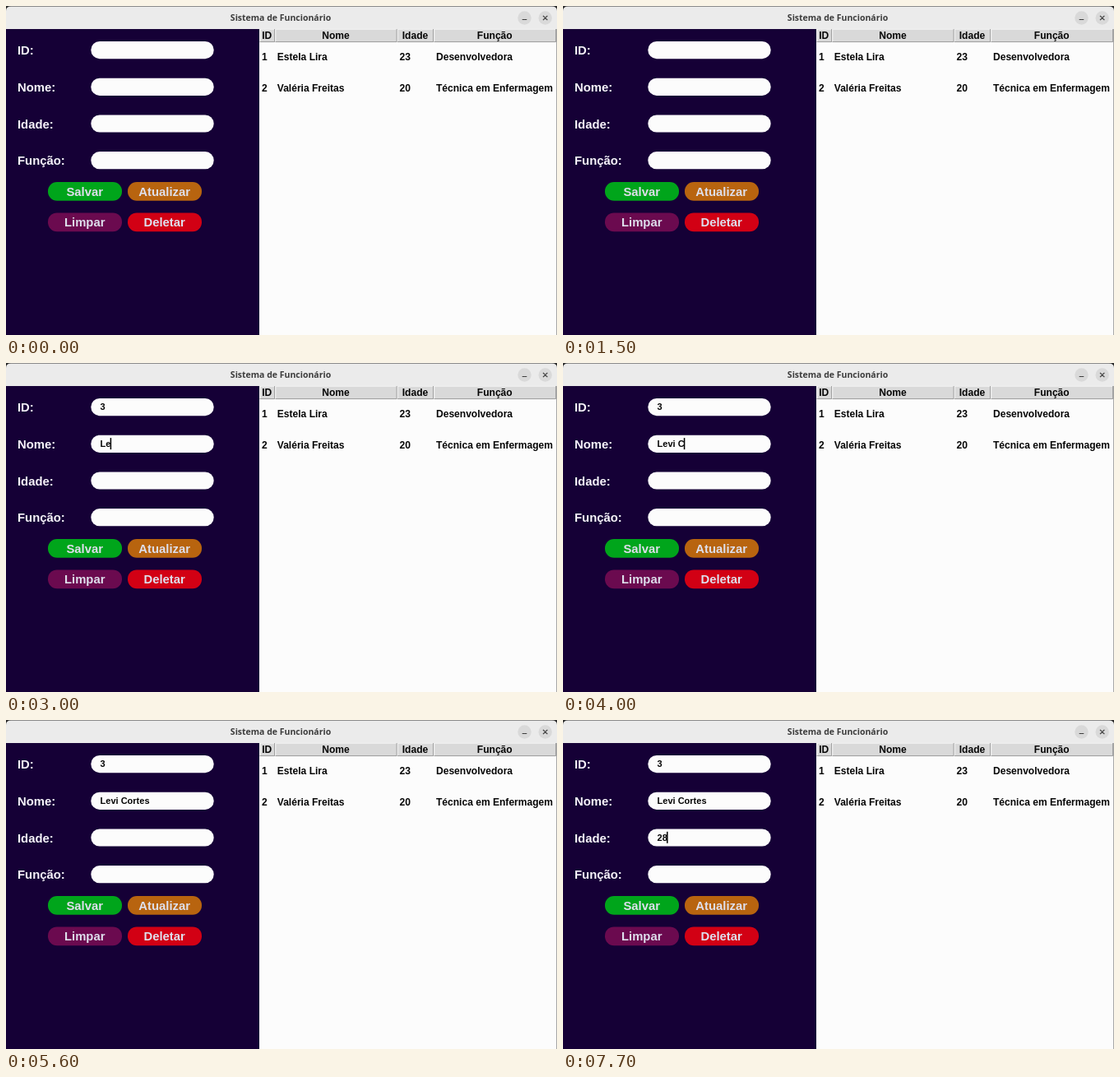
These frames come from a looping animation (670x400 px, 8000 ms). An HTML page:

```html
<!DOCTYPE html>
<html lang="pt">
<head>
<meta charset="utf-8">
<title>Sistema de Funcionário</title>
<style>
  html, body { margin: 0; width: 100%; height: 100%; overflow: hidden; background: #fcfcfc; }
  svg { display: block; width: 670px; height: 400px; }
  text { font: bold 12.05px "Liberation Sans", Arial, sans-serif; fill: #060606; white-space: pre; }
  .title { font: bold 10.5px "Noto Sans", sans-serif; fill: #3d3d3d; }
  .label { font-size: 14.85px; fill: #f6f4fa; }
  .button { font-size: 14.85px; fill: #dedfec; }
  .typed { font-size: 11px; }
  .mid { text-anchor: middle; }
</style>
</head>
<body>
<svg id="stage" viewBox="0 0 670 400">
  <rect width="670" height="400" fill="#fcfcfc"/>
  <rect width="670" height="28" fill="#2b2b2b"/>
  <path d="M0 28V6Q0 .5 6 .5H664Q670 .5 670 6V28Z" fill="#ebebeb"/>
  <text class="title mid" x="334" y="18.3">Sistema de Funcionário</text>
  <g fill="#d9d9d9">
    <circle cx="630.5" cy="14.5" r="8.2"/>
    <circle cx="655.7" cy="14.5" r="8.2"/>
  </g>
  <path d="M627.7 16.5h5.6M653 11.8l5.4 5.4m0-5.4l-5.4 5.4" stroke="#3d3d3d" stroke-width="1.2" fill="none"/>
  <rect y="28" width="308" height="372" fill="#150036"/>
  <path d="M669.5 28V400" stroke="#a8a8a8"/>
</svg>
<script>
const LOOP = 8000;
const stage = document.getElementById('stage');

function add(tag, attrs, content = '') {
  const el = document.createElementNS('http://www.w3.org/2000/svg', tag);
  for (const key in attrs) el.setAttribute(key, attrs[key]);
  el.textContent = content;
  stage.appendChild(el);
  return el;
}

// Table: header cells with a raised edge, then the rows
const columns = [['ID', 308.5, 327], ['Nome', 327.5, 475.5], ['Idade', 476, 520], ['Função', 520.5, 669]];
for (const [name, x, end] of columns) {
  add('rect', { x, y: 28, width: end - x, height: 16, fill: '#d9d9d9' });
  add('path', { d: `M${x + .4} 43.5V28.4H${end}`, stroke: '#f7f7f7', 'stroke-width': .8, fill: 'none' });
  add('path', { d: `M${x} 43.6H${end - .4}V28`, stroke: '#8c8c8c', 'stroke-width': .8, fill: 'none' });
  add('text', { x: (x + end) / 2 - .5, y: 40.3, class: 'mid' }, name);
}
const rows = [
  ['1', 'Estela Lira', '23', 'Desenvolvedora'],
  ['2', 'Valéria Freitas', '20', 'Técnica em Enfermagem']
];
rows.forEach((row, r) => row.forEach((cell, c) =>
  add('text', { x: [311, 329.8, 478.6, 523][c], y: 66.3 + r * 37.3 }, cell)));

// Form
const fields = ['ID:', 'Nome:', 'Idade:', 'Função:'].map((name, i) => {
  const y = 43 + i * 44.7;
  add('text', { x: 14, y: y + 16.2, class: 'label' }, name);
  add('rect', { x: 103.3, y, width: 149.4, height: 21.2, rx: 10.5, fill: '#fcfcfc' });
  return add('text', { x: 114.6, y: y + 14.1, class: 'typed' });
});
const buttons = [
  ['Salvar', 51, 214, '#00a51b'], ['Atualizar', 148, 214, '#b8640f'],
  ['Limpar', 51, 251.4, '#6b0a4f'], ['Deletar', 148, 251.4, '#d20014']
];
for (const [name, x, y, fill] of buttons) {
  add('rect', { x, y, width: 90, height: 22.8, rx: 11, fill });
  add('text', { x: x + 44.7, y: y + 16.8, class: 'button mid' }, name);
}
const caret = add('rect', { width: 1.5, height: 14, fill: '#000' });

// Each entry: focus time, end of focus, text and the time of every key
const typing = [
  { from: 1600, to: 2000, text: '3', keys: [1800] },
  { from: 2000, to: 5000, text: 'Levi Cortes',
    keys: [2800, 3000, 3100, 3200, 3600, 4000, 4100, 4300, 4400, 4500, 4700] },
  { from: 5000, to: LOOP, text: '28', keys: [6000, 6200] }
];

function draw() {
  const t = performance.now() % LOOP;
  let shown = false;
  typing.forEach(({ from, to, text, keys }, i) => {
    const field = fields[i];
    const value = text.slice(0, keys.filter(key => key <= t).length);
    if (field.textContent !== value) field.textContent = value;
    // The caret is on for 600 ms and off for 300 ms
    if (t >= from && t < to && (t - from) % 900 < 600) {
      shown = true;
      const width = value ? field.getComputedTextLength() : 0;
      caret.setAttribute('x', 113.8 + width);
      caret.setAttribute('y', 46.4 + i * 44.7);
    }
  });
  caret.setAttribute('visibility', shown ? 'visible' : 'hidden');
  requestAnimationFrame(draw);
}
draw();
</script>
</body>
</html>
```
